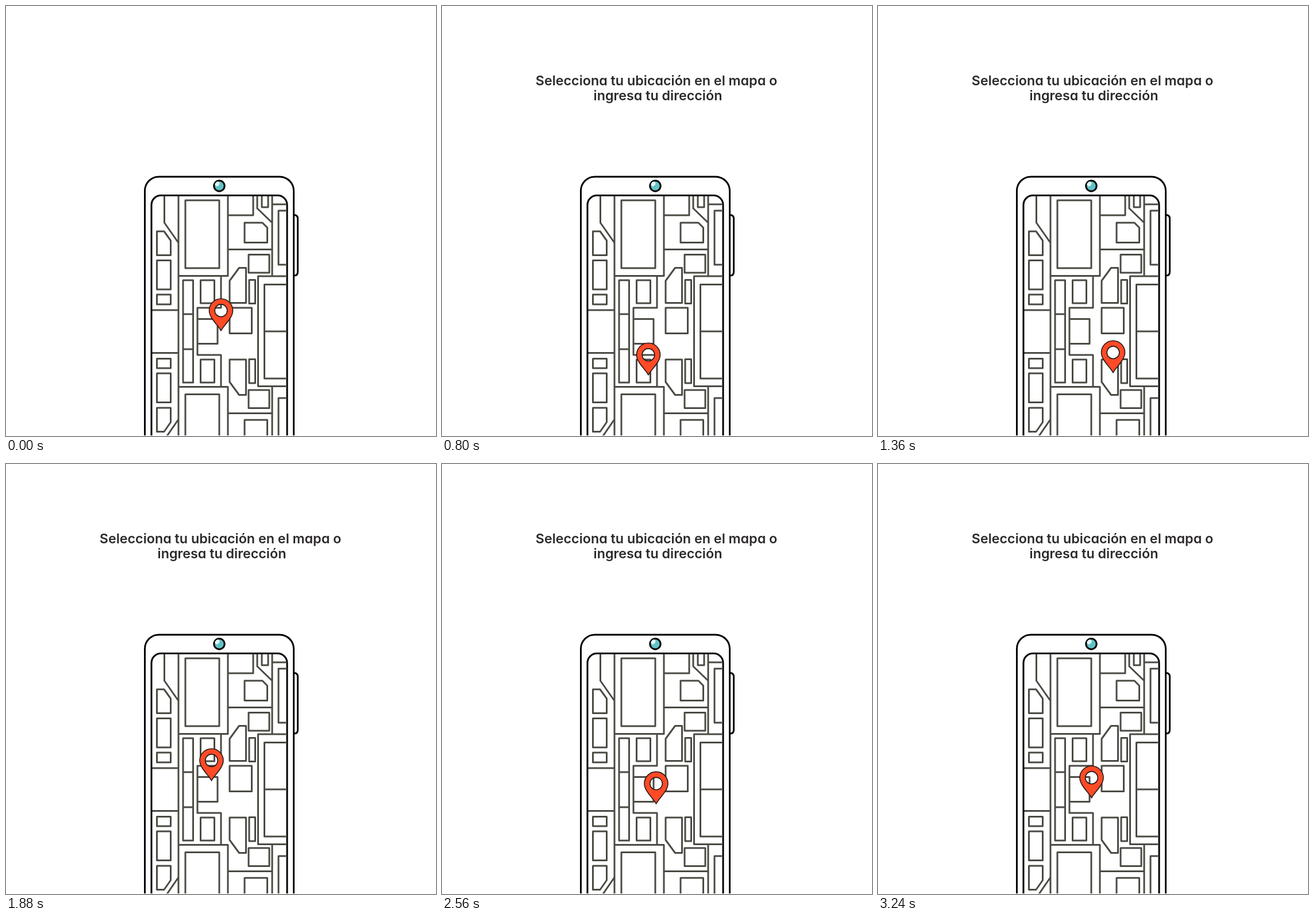
Recreate the animation shown at these times as an HTML page. Size 748x748 px, loop 3840 ms.

```html
<!DOCTYPE html>
<html lang="es">
<head>
<meta charset="utf-8">
<title>Ubicación</title>
<style>
  html, body { margin: 0; width: 100%; height: 100%; overflow: hidden; background: #fff; }
  svg { display: block; width: 100vw; height: 100vh; }
  .map { fill: none; stroke: #4b4a43; stroke-width: 3; stroke-linejoin: round; }
  .body { fill: none; stroke: #000; stroke-width: 3; }
  text {
    font: 600 23.3px Inter, "Open Sans", sans-serif;
    font-feature-settings: "cv11";
    fill: #2c292b;
    text-anchor: middle;
  }
</style>
</head>
<body>
<svg viewBox="0 0 748 748">
  <defs>
    <clipPath id="screen"><rect x="253" y="329" width="234" height="418"/></clipPath>
    <clipPath id="stage"><rect width="748" height="747"/></clipPath>
  </defs>

  <g id="title">
    <text x="373" y="138">Selecciona tu ubicación en el mapa o</text>
    <text x="375.5" y="164.3">ingresa tu dirección</text>
  </g>

  <g class="map" clip-path="url(#screen)">
    <!-- streets -->
    <path d="M300 329V760M275.5 329V377L300 412M253 529H300M253 603.5H300M280 748L300 719
      M386 329V469.5H300M374 469.5V525H333V607H374V662.5M300 662.5H386V760
      M386 423.5H463M386 708.5H463M386 364H430V329M437 329V352L463 377M445 329V350H456V329
      M463 329V470M463 345H490M463 661.5V760M490 470H438.5V661.5H490"/>
    <!-- blocks -->
    <path d="M312 338H371V456H312ZM312 675.5H371V760H312ZM415 377H446L454.5 385.5V411.5H415Z
      M415 720H454.5V760H415ZM422 432.5H458V464H422ZM422 668H458V699.5H422Z
      M262.5 442.5H286.5V493H262.5ZM262.5 502H286.5V519H262.5Z
      M262.5 613.5H286.5V630H262.5ZM262.5 639H286.5V689.5H262.5Z
      M338.5 477H362.5V517H338.5ZM338.5 615H362.5V655H338.5Z
      M423 476.5H433.5V517.5H423ZM423 614.5H433.5V656H423ZM389 525H427.5V569.5H389Z
      M308 477H325.5V655H308ZM308 536H325.5M308 597H325.5M333 544.5H368V587.5H333
      M262.5 392H275L286.5 408V433.5H262.5ZM262.5 699H286.5V724L275 740.5H262.5Z
      M405.5 455.5H417.5V516.5H389V478ZM389 615H417.5V676.5H405.5L389 654Z
      M490 484.5H449.5V648H490M449.5 566H490M490 356H474V450H490M490 682H474V760"/>
  </g>

  <g class="body" clip-path="url(#stage)">
    <path d="M241.5 760V321.5A24.5 24.5 0 0 1 266 297H476A24.5 24.5 0 0 1 500.5 321.5V760"/>
    <path d="M253 760V346A16.5 16.5 0 0 1 269.5 329.5H472.5A16.5 16.5 0 0 1 489 346V760"/>
    <path d="M501 363.5Q507.5 363.5 507.5 370V462.5Q507.5 469 501 469"/>
    <circle cx="371" cy="313" r="9.2" style="fill:#62c2c6"/>
    <ellipse cx="367.5" cy="309.5" rx="3.4" ry="4.4" transform="rotate(40 367.5 309.5)" style="fill:#e4f6f6;stroke:none"/>
  </g>

  <path id="pin" fill="#ff4a26" fill-rule="evenodd" stroke="#241a18" stroke-width="1.6" stroke-linejoin="round"
    d="M0 0C-5-10-20.5-22-20.5-35.3A20.5 20.5 0 0 1 20.5-35.3C20.5-22 5-10 0 0Z
      M-10.8-35.3A10.8 10.8 0 0 0 10.8-35.3A10.8 10.8 0 0 0-10.8-35.3Z"/>
</svg>

<script>
const LOOP = 3840, STEP = 40, LAST = 3240, GROW = 720;
const PIVOT = [369, 137.6];

// Pin tip as [ms, position]
const tipX = [[0, 374], [440, 408], [500, 409], [800, 359], [940, 352], [1290, 415], [1360, 409],
  [1700, 334], [1880, 357.5], [2180, 377], [2560, 372.5], [3240, 371.5]];
const tipY = [[0, 565], [440, 622], [560, 631], [800, 642], [1120, 671], [1190, 678], [1360, 638],
  [1720, 518], [1880, 551], [2080, 583], [2340, 565], [2600, 593], [2860, 565], [3120, 590], [3240, 581]];

const title = document.getElementById('title');
const pin = document.getElementById('pin');

// Monotone cubic curve: rests at every turning point
function curve(keys) {
  const slope = keys.slice(1).map(([t, v], i) => (v - keys[i][1]) / (t - keys[i][0]));
  const tangent = keys.map((_, i) => {
    const a = slope[i - 1] || 0, b = slope[i] || 0;
    return a * b > 0 ? 2 * a * b / (a + b) : 0;
  });
  return t => {
    let i = 0;
    while (i < keys.length - 2 && t > keys[i + 1][0]) i++;
    const [t0, v0] = keys[i], [t1, v1] = keys[i + 1];
    const d = t1 - t0, u = (t - t0) / d, w = 1 - u;
    return v0 * w * w * (1 + 2 * u) + v1 * u * u * (3 - 2 * u)
      + d * u * w * (tangent[i] * w - tangent[i + 1] * u);
  };
}

const pinX = curve(tipX), pinY = curve(tipY);

function draw(ms) {
  const t = Math.min(Math.floor(ms % LOOP / STEP) * STEP, LAST);
  const s = Math.min(t / GROW, 1);
  const [px, py] = PIVOT;
  title.setAttribute('visibility', s ? 'visible' : 'hidden');
  title.setAttribute('transform', `translate(${px * (1 - s)} ${py * (1 - s)}) scale(${s})`);
  pin.setAttribute('transform', `translate(${pinX(t)} ${pinY(t)})`);
}

const start = performance.now();
function tick() {
  draw(performance.now() - start);
  requestAnimationFrame(tick);
}
tick();
</script>
</body>
</html>
```
